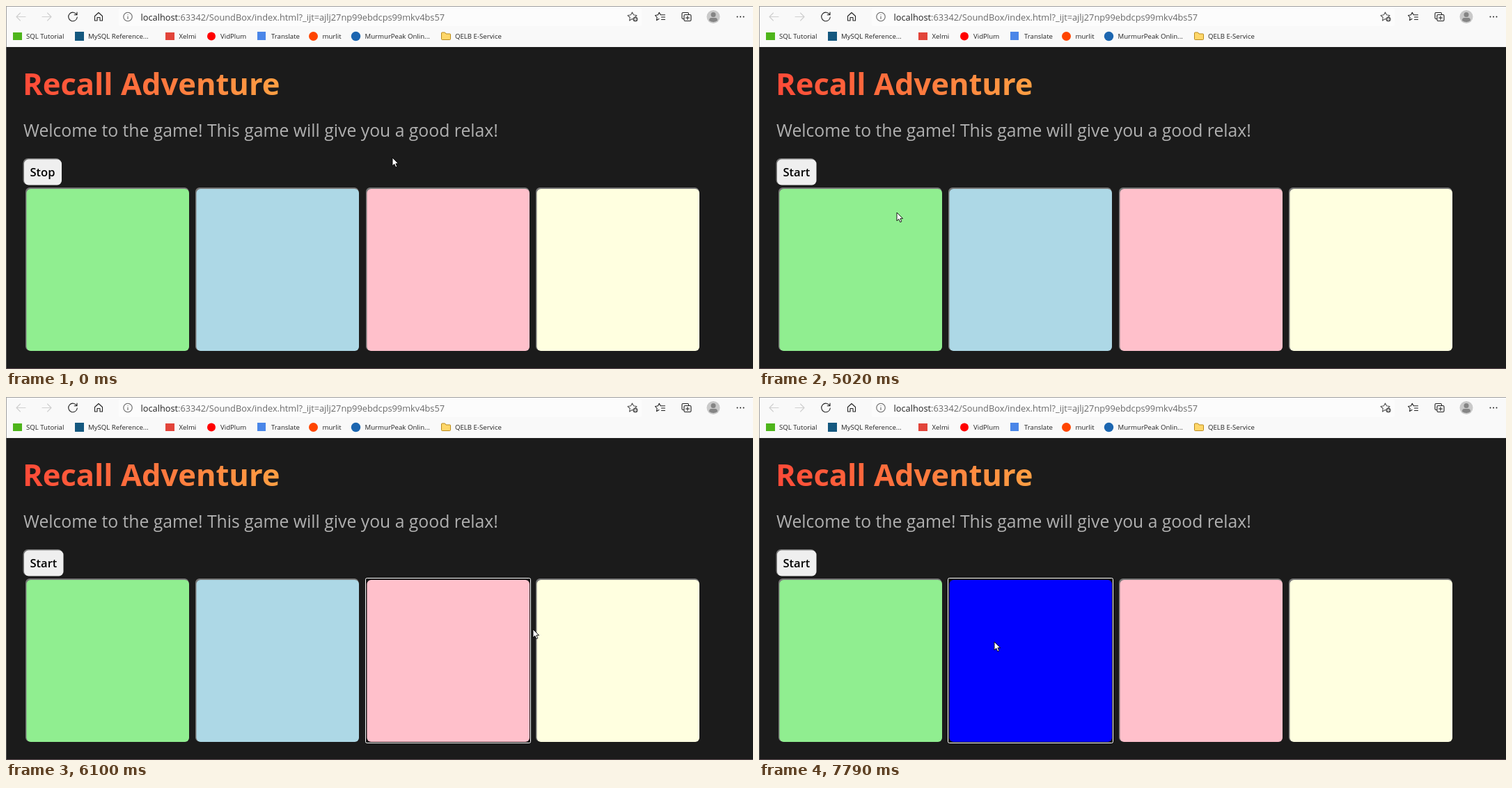
These frames come from a looping animation (1073x522 px, 8 s). An HTML page:

```html
<!DOCTYPE html>
<html lang="en">
<head>
<meta charset="utf-8">
<title>Recall Adventure</title>
<style>
html, body { margin: 0; width: 100%; height: 100%; overflow: hidden; background: #1b1b1b; }
svg { display: block; width: 1073px; height: 522px; font-family: "Open Sans", "Noto Sans", sans-serif; }
.marks { font-size: 9.65px; fill: #222; }
.icon { fill: none; stroke: #222; stroke-width: 1.1; stroke-linecap: round; stroke-linejoin: round; }
</style>
</head>
<body>
<svg viewBox="0 0 1073 522">
  <defs>
    <linearGradient id="warm" gradientUnits="userSpaceOnUse" x1="25" x2="393">
      <stop stop-color="#ff4a38"/><stop offset="1" stop-color="#ff9f43"/>
    </linearGradient>
  </defs>

  <!-- browser bars -->
  <rect width="1073" height="59" fill="#f9f9f9"/>
  <rect x="162" y="3" width="751" height="26" rx="3" fill="#fcfcfc"/>
  <path d="M0 .5H1073M.5 0V59" stroke="#a0a0a0"/>
  <path d="M.5 59V522" stroke="#555"/>
  <path d="M0 521.5H1073" stroke="#5c4a50"/>
  <g class="icon">
    <path stroke="#d0d0d0" d="M28 15.5H15M20.5 10L15 15.5L20.5 21M52 15.5H65M59.5 10L65 15.5L59.5 21"/>
    <path d="M101.6 12.5A6.3 6.3 0 1 0 102.3 16M102 9V12.8H98.2"/>
    <path d="M127.5 14.5L133 9.5L138.5 14.5V21H135V16.5H131V21H127.5Z"/>
    <g stroke="#666"><circle cx="175" cy="15.5" r="6.2"/><path d="M175 15V18.5M175 12.5V12.6"/></g>
    <path stroke="#555" d="M903 20L899.5 18.5L895.5 21L896.3 16.5L893 13.5L897.5 12.8L899.5 9L901.5 12.8L906 13.5L904 15.5"/>
    <circle cx="904" cy="19" r="3.5" fill="#555" stroke="none"/>
    <path stroke="#f9f9f9" d="M902.2 19H905.8M904 17.2V20.8"/>
    <path d="M938 18.5L934.5 20.5L935.2 16.5L932.5 13.5L936.5 12.8L938.3 9.3L940.2 12.8H946.5M941.5 16H946.5M941.5 19.5H946.5"/>
    <path d="M973.5 18.5H972.5Q971 18.5 971 17V11Q971 9.5 972.5 9.5H979Q980.5 9.5 980.5 11V12"/>
    <rect x="974" y="12.5" width="10" height="9" rx="1.5"/><path d="M979 14.5V19.5M976.5 17H981.5"/>
  </g>
  <circle cx="1016" cy="15.5" r="9.5" fill="#c9c9c9"/>
  <circle cx="1016" cy="12.5" r="3.5" fill="#858585"/>
  <path d="M1010 21Q1010 17 1013 17H1019Q1022 17 1022 21Q1016 25 1010 21" fill="#858585"/>
  <path d="M1050.5 15.5H1061" stroke="#222" stroke-width="2" stroke-linecap="round" stroke-dasharray="0 4.5"/>
  <text x="193.5" y="20.5" font-size="12.79" fill="#6a6a6a"><tspan fill="#222">localhost</tspan>:63342/SoundBox/index.html?_ijt=ajlj27np99ebdcps99mkv4bs57</text>

  <rect x="10" y="38" width="13" height="11" fill="#4eb51b"/>
  <rect x="99" y="37" width="13" height="13" fill="#14587f"/>
  <rect x="229" y="38" width="13" height="11" fill="#e2443a"/>
  <circle cx="295" cy="43.5" r="6" fill="#f00"/>
  <rect x="361" y="37" width="12" height="12" fill="#4a86e8"/>
  <circle cx="441.5" cy="43.5" r="6.5" fill="#ff4500"/>
  <circle cx="502.5" cy="43.5" r="6.7" fill="#1c66b0"/>
  <path d="M625.5 47.5V39Q625.5 38 626.5 38H630.5L632 40H637.5Q638.5 40 638.5 41V47.5Q638.5 48.5 637.5 48.5H626.5Q625.5 48.5 625.5 47.5Z" fill="#ffd76a" stroke="#b98a1d"/>
  <g class="marks">
    <text x="29" y="47">SQL Tutorial</text>
    <text x="118" y="47">MySQL Reference...</text>
    <text x="248.5" y="47">Xelmi</text>
    <text x="308" y="47">VidPlum</text>
    <text x="381" y="47">Translate</text>
    <text x="454.5" y="47">murlit</text>
    <text x="515.5" y="47">MurmurPeak Onlin...</text>
    <text x="645" y="47">QELB E-Service</text>
  </g>

  <!-- page -->
  <text x="24" y="128" font-size="43.5" font-weight="700" fill="url(#warm)">Recall Adventure</text>
  <text x="25" y="188" font-size="24.72" fill="#b0b0b0">Welcome to the game! This game will give you a good relax!</text>
  <rect id="edge" x="24.5" y="219" height="38" rx="7" fill="#767676"/>
  <rect id="face" x="26" y="220.5" height="37" rx="6.5" fill="#efefef"/>
  <text id="label" x="34.5" y="245" font-size="16.5" font-weight="600"></text>
  <g id="tiles"></g>
  <path id="cursor" d="M0 0V12L2.8 9.4L4.8 13.8L6.8 12.9L4.9 8.7H8.6Z" fill="#fff" stroke="#000" stroke-width=".9"/>
</svg>
<script>
const LOOP = 8000, STEP = 120, START = 4040;
const $ = id => document.getElementById(id);
const calm = ['lightgreen', 'lightblue', 'pink', 'lightyellow'];
const lit = ['green', 'blue', 'red', 'yellow'];

// pointer glides: start time, steps, end x, end y, tile pressed on arrival
const glides = [
  [0, 1, 555, 218], [990, 1, 556, 218], [1730, 5, 496, 224], [2950, 1, 494, 224],
  [3320, 6, 72, 230], [START, 3, 246, 214],
  [4900, 3, 190, 310, 0], [5260, 4, 448, 305, 1], [5740, 3, 658, 321, 2], [6100, 3, 855, 346, 3],
  [6460, 3, 620, 365, 2], [6820, 2, 373, 373, 1], [7060, 2, 210, 362, 0], [7300, 1, 206, 360],
  [7550, 3, 338, 352, 1]
];
const arrival = ([start, steps]) => start + STEP * (steps - 1);

$('tiles').innerHTML = calm.map((_, i) => `<g transform="translate(${Math.floor(28 + 244.5 * i)} 261)">
  <rect width="234.5" height="234.5" rx="6" fill="#767676"/>
  <rect x="-.5" y="-.5" width="237" height="237" rx="2" fill="#101010" stroke="#fff"/>
  <rect x="1.5" y="2" width="233.5" height="233" rx="6"/></g>`).join('');

function pointer(t) {
  const i = glides.findLastIndex(g => g[0] <= t);
  const to = glides[i], from = glides[i - 1] || to;
  const step = Math.min(to[1], 1 + Math.floor((t - to[0]) / STEP));
  const ease = Math.sin(Math.PI / 2 * step / to[1]);
  return [2, 3].map(k => Math.round(from[k] + (to[k] - from[k]) * ease));
}

function draw(now) {
  const t = now % LOOP;
  const press = glides.findLast(g => g[4] >= 0 && arrival(g) <= t);
  const down = press && (press === glides.at(-1) || t - arrival(press) < STEP);
  [...$('tiles').children].forEach((tile, i) => {
    const focus = press && press[4] === i;
    tile.children[1].style.display = focus ? '' : 'none';
    tile.children[2].style.fill = (focus && down ? lit : calm)[i];
  });
  const started = t >= START;
  $('label').textContent = started ? 'Start' : 'Stop';
  $('edge').setAttribute('width', started ? 57 : 54.5);
  $('face').setAttribute('width', started ? 56.5 : 54);
  $('cursor').setAttribute('transform', `translate(${pointer(t)})`);
  requestAnimationFrame(draw);
}
requestAnimationFrame(draw);
</script>
</body>
</html>
```
